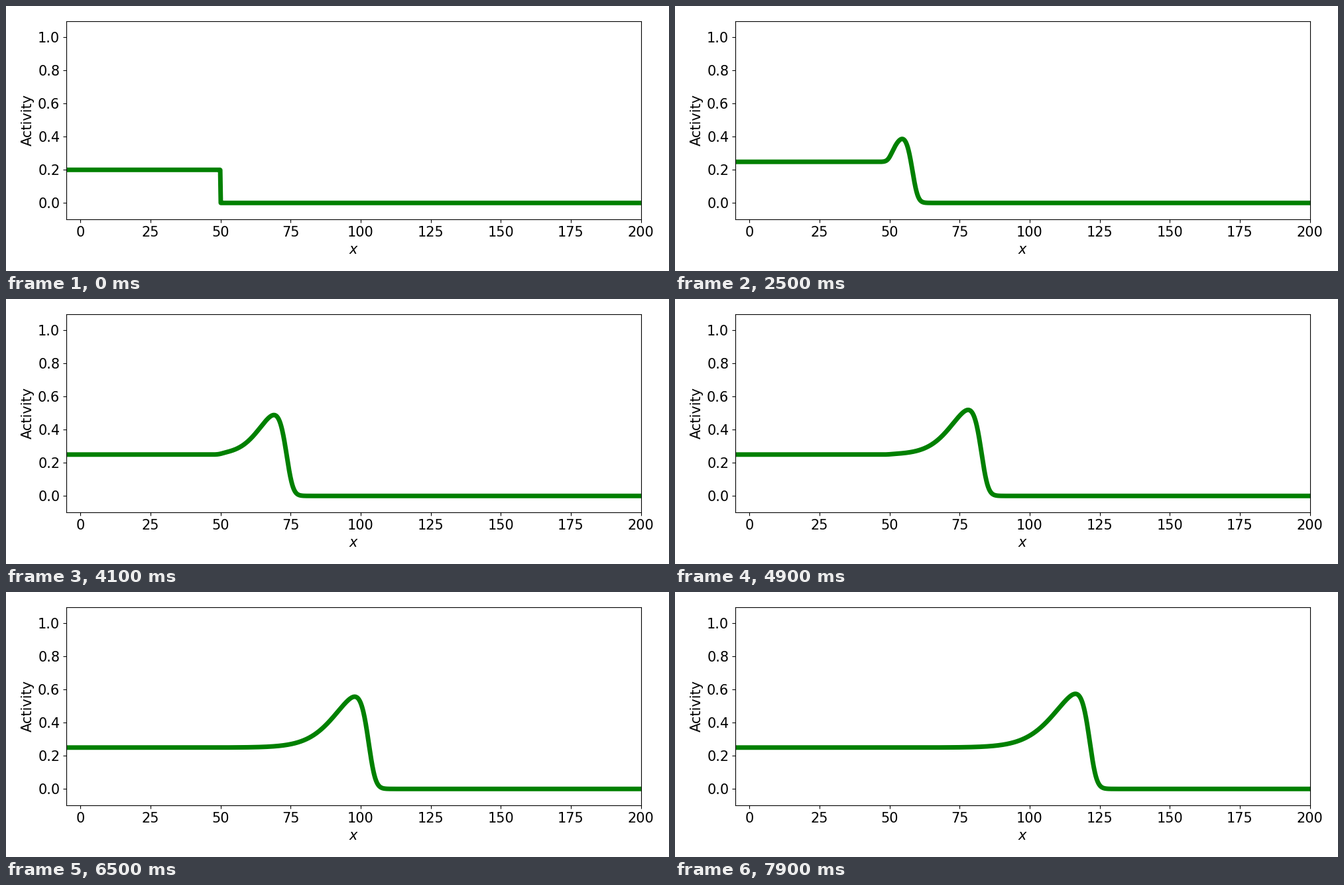
Write a matplotlib script that moves like this. It is 1000 px wide and 400 px high and loops after 8 s.

```python
import numpy as np
import matplotlib.pyplot as plt
from matplotlib.animation import FuncAnimation

STEP_MS = 100
FRAMES = 80
EDGE = 50          # where the active region ends at the start
START = 0.7        # seconds until the front sets off
RAMP = 2.2         # time constant of its acceleration
TOP_SPEED = 14     # final speed, units of x per second

plt.rcParams["font.family"] = "DejaVu Sans"
plt.rcParams["font.size"] = 15


def sigmoid(z):
    return 1 / (1 + np.exp(-np.clip(z, -60, 60)))


def plateau(t):
    """Resting level behind the wave, settling from 0.2 to 0.25."""
    s = 2.1 * t
    return 0.25 - 0.05 * (1 + s) * np.exp(-s)


def activity(x, t):
    s = max(t - START, 0)
    pace = 1 - np.exp(-s / RAMP)
    front = EDGE + TOP_SPEED * (s - RAMP * pace)

    # crest that trails the front and only exists beyond the edge
    length = 0.05 + 6.6 * pace ** 2
    crest = 0.53 * pace ** 1.55 * sigmoid((x - front + 10.6 * pace) / length)
    crest *= sigmoid((x - EDGE) / 0.8)

    # falling flank: soft shoulder, sharp foot
    width = 0.02 + 1.63 * (1 - np.exp(-t / 1.6))
    flank = sigmoid((front - x) / width + 0.8) ** 2
    return (plateau(t) + crest) * flank


x = np.arange(-10, 210, 0.1)

fig, ax = plt.subplots(figsize=(10, 4), dpi=100)
line, = ax.plot(x, activity(x, 0), color="green", linewidth=5)
ax.set_xlim(-5, 200)
ax.set_ylim(-0.1, 1.1)
ax.set_xticks(range(0, 201, 25))
ax.set_xlabel("$x$")
ax.set_ylabel("Activity")
fig.tight_layout()


def update(frame):
    line.set_ydata(activity(x, frame * STEP_MS / 1000))
    return line,


anim = FuncAnimation(fig, update, frames=FRAMES, interval=STEP_MS,
                     repeat=True, repeat_delay=0)
plt.show()
```
